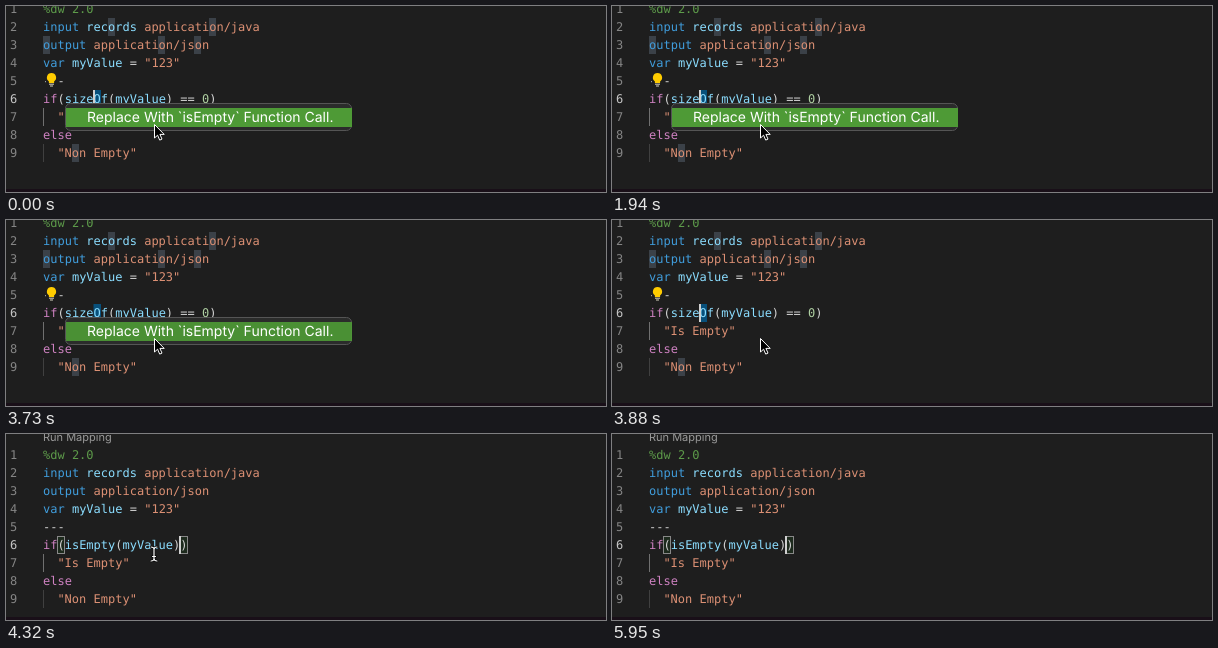
These frames come from a looping animation (600 px wide and 186 px high, 6220 ms). An HTML page:

```html
<!DOCTYPE html>
<html lang="en">
<head>
<meta charset="utf-8">
<title>Editor quick fix</title>
<style>
html, body { margin: 0; width: 100%; height: 100%; overflow: hidden; background: #1e1e1e; }
svg { display: block; width: 600px; height: 186px; }
text { white-space: pre; text-rendering: geometricPrecision; }
.code { font: 12px "DejaVu Sans Mono", monospace; fill: #d4d4d4; }
.lens { font: 11px Inter, sans-serif; fill: #999; }
.label { font: 14px Inter, sans-serif; fill: #fff; }
.num { fill: #858585; }
.cur { fill: #c6c6c6; }
.kw { fill: #409ddc; }
.id { fill: #8bddff; }
.str { fill: #dc9074; }
.com { fill: #5d9b4a; }
.ctl { fill: #cf82c2; }
.lit { fill: #afd0a2; }
.hit { fill: #3b4148; }
.match { fill: #1d2a1d; stroke: #888; }
.caret { fill: #d0d0d0; }

.scene, .before, .after, .caret, .menu, .bar, .arrow, .beam, .patch {
  animation: 6220ms step-end infinite;
}
.scene { animation-name: scroll; }
.before, .arrow { animation-name: before; }
.after { animation-name: after; }
.caret { animation-name: blink; }
.menu { animation-name: menu; }
.bar { animation-name: flash; }
.beam { animation-name: beam; }
.patch { animation-name: patch; }

@keyframes scroll {
  0% { transform: none; }
  69.453%, 100% { transform: translateY(18px); }
}
@keyframes before {
  0% { opacity: 1; }
  64.79%, 100% { opacity: 0; }
}
@keyframes after {
  0% { opacity: 0; }
  64.79%, 100% { opacity: 1; }
}
@keyframes blink {
  0%, 14.308%, 31.189%, 45.659%, 62.379%, 81.511%, 95.659%, 100% { opacity: 1; }
  7.234%, 21.543%, 38.424%, 55.144%, 71.864%, 88.745% { opacity: 0; }
}
@keyframes menu {
  0% { opacity: 1; }
  62.379%, 100% { opacity: 0; }
}
@keyframes flash {
  0% { opacity: 1; }
  57.556% { opacity: 0; }
  59.967%, 100% { opacity: .92; }
}
@keyframes patch {
  0%, 67.041%, 100% { opacity: 0; }
  64.79% { opacity: 1; }
}
@keyframes beam {
  0% { opacity: 0; transform: translate(148px, 120px); }
  64.79% { opacity: 1; transform: translate(148px, 120px); }
  88.745% { opacity: 1; transform: translate(196.5px, 143px); }
  90.996% { opacity: 1; transform: translate(217.5px, 159px); }
  93.408% { opacity: 1; transform: translate(460.5px, 181px); }
  95.659%, 100% { opacity: 0; transform: translate(460.5px, 181px); }
}
</style>
</head>
<body>
<svg viewBox="0 0 600 186">
  <rect width="600" height="186" fill="#1e1e1e"/>

  <g class="scene">
    <text class="lens" x="37" y="-11">Run Mapping</text>

    <g class="before">
      <g class="hit">
        <rect x="102" y="12" width="7" height="18"/>
        <rect x="203" y="12" width="7" height="18"/>
        <rect x="37" y="30" width="7" height="18"/>
        <rect x="152" y="30" width="7" height="18"/>
        <rect x="188" y="30" width="7" height="18"/>
        <rect x="66" y="138" width="7" height="18"/>
      </g>
      <rect x="87.5" y="84" width="7.5" height="18" fill="#08507b"/>
    </g>

    <path d="M37.5 102v18" stroke="#707070"/>
    <path d="M37.5 138v18" stroke="#404040"/>

    <g class="code num">
      <text x="4" y="7">1</text>
      <text x="4" y="25">2</text>
      <text x="4" y="43">3</text>
      <text x="4" y="61">4</text>
      <text x="4" y="79">5</text>
      <text x="4" y="97" class="cur">6</text>
      <text x="4" y="115">7</text>
      <text x="4" y="133">8</text>
      <text x="4" y="151">9</text>
    </g>

    <g class="code">
      <text x="37" y="7" class="com">%dw 2.0</text>
      <text x="37" y="25"><tspan class="kw">input</tspan> <tspan class="id">records</tspan> <tspan class="str">application/java</tspan></text>
      <text x="37" y="43"><tspan class="kw">output</tspan> <tspan class="str">application/json</tspan></text>
      <text x="37" y="61"><tspan class="kw">var</tspan> <tspan class="id">myValue</tspan> = <tspan class="str">"123"</tspan></text>
      <text x="37" y="79">---</text>
      <text x="51.4" y="115" class="str">"Is Empty"</text>
      <text x="37" y="133" class="ctl">else</text>
      <text x="51.4" y="151" class="str">"Non Empty"</text>
    </g>

    <g class="before">
      <text class="code" x="37" y="97"><tspan class="ctl">if</tspan>(<tspan class="id">sizeOf</tspan>(<tspan class="id">myValue</tspan>) == <tspan class="lit">0</tspan>)</text>
      <rect class="caret" x="87" y="84" width="2" height="18"/>
      <rect x="40" y="66" width="11" height="15" fill="#1e1e1e"/>
      <path d="M45.5 67a4.6 4.6 0 0 1 2.6 8.4v1.6h-5.2v-1.6a4.6 4.6 0 0 1 2.6-8.4z" fill="#fc0"/>
      <path d="M43 78.2h5M44 80h3" stroke="#d8d3c0"/>
    </g>

    <g class="after">
      <rect class="match" x="51.5" y="84.5" width="7" height="17"/>
      <rect class="match" x="174.5" y="84.5" width="7" height="17"/>
      <text class="code" x="37" y="97"><tspan class="ctl">if</tspan>(<tspan class="id">isEmpty</tspan>(<tspan class="id">myValue</tspan>))</text>
      <rect class="caret" x="173" y="84" width="2" height="18"/>
    </g>
    <rect class="patch" x="175" y="99" width="6" height="3" fill="#1e1e1e"/>
  </g>

  <rect y="183" width="600" height="3" fill="#190f18"/>

  <g class="menu">
    <rect x="59.5" y="97.5" width="286" height="27" rx="5" fill="#2b2c2b" stroke="#555"/>
    <rect class="bar" x="60" y="102" width="286" height="19" fill="#4e9a36"/>
    <text class="label" x="81" y="116">Replace With `isEmpty` Function Call.</text>
  </g>

  <path class="arrow" d="M148.5 118.500v13.500l3.100-2.800 2.100 4.900 2.300-1-2.100-4.700h4.300z" fill="#000" stroke="#fff"/>

  <g class="beam" fill="none" stroke-linecap="round">
    <path id="bar" d="M-3-7q3 0 3 2.500q0-2.500 3-2.500M0-4.500v9M-3 7q3 0 3-2.500q0 2.500 3 2.500M-1.500 2.500h3" stroke="#000" stroke-width="2.400"/>
    <path d="M-3-7q3 0 3 2.500q0-2.500 3-2.500M0-4.500v9M-3 7q3 0 3-2.500q0 2.500 3 2.500M-1.500 2.500h3" stroke="#fff" stroke-width="1.200"/>
  </g>
</svg>
</body>
</html>
```
